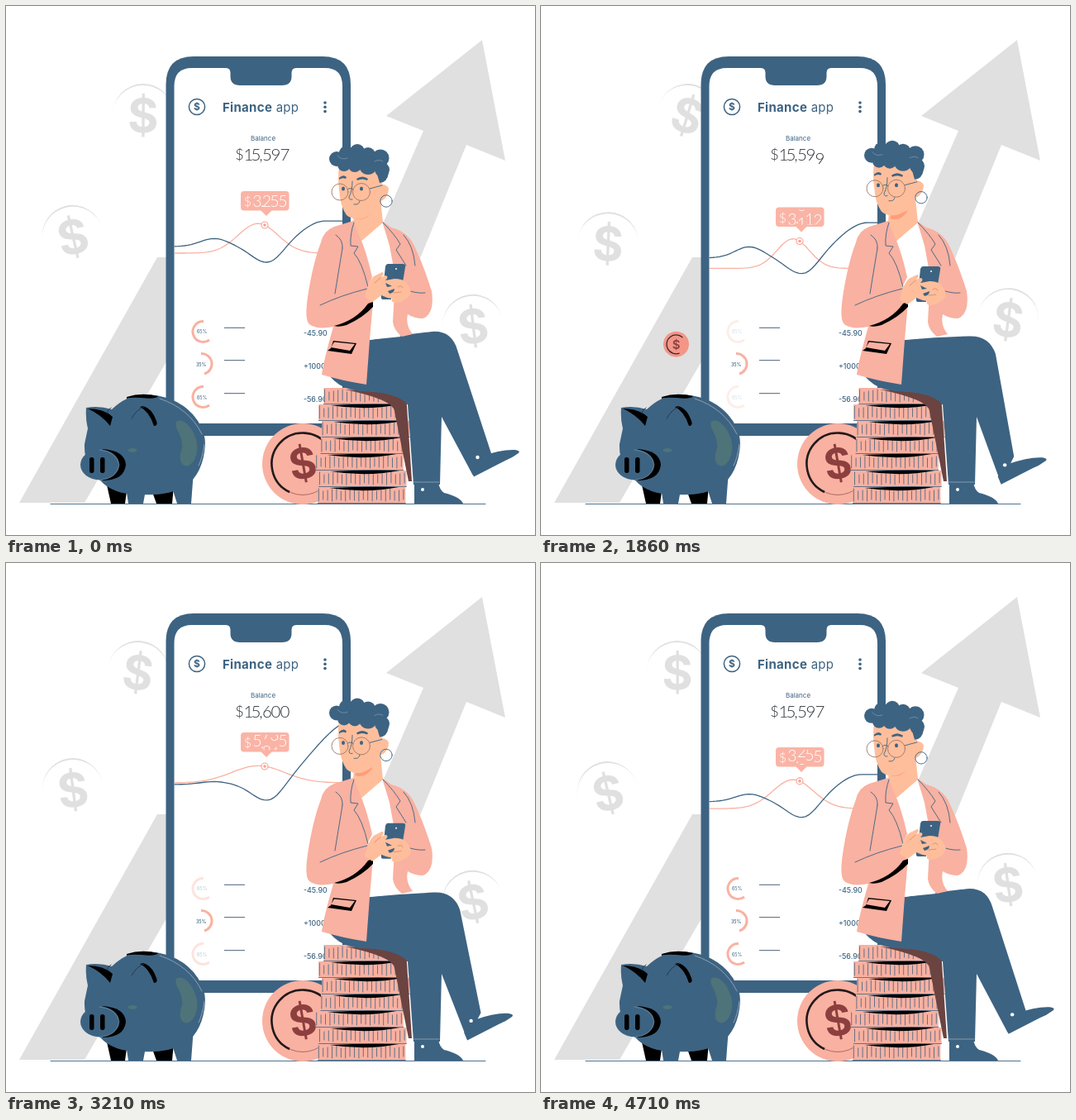
An HTML page that plays this animation: 640 by 640 pixels, repeating every 4.78 s.

```html
<!DOCTYPE html>
<html lang="en">
<head>
<meta charset="utf-8">
<title>Finance app</title>
<style>
  html, body { margin: 0; width: 100%; height: 100%; overflow: hidden; background: #fff; }
  svg { display: block; width: 100%; height: 100%; }
  text { text-anchor: middle; }
  .ui { font-family: Inter, sans-serif; fill: #3d6382; }
  .num { font-family: Lato, sans-serif; font-weight: 300; }
  .left text, text.left { text-anchor: start; }
  .blue { fill: #3d6382; }
  .pink { fill: #f9b1a1; }
  .skin { fill: #ffbe9b; }
  .grey { fill: #e0e0e0; }
  .line { fill: none; stroke: #3d6382; stroke-width: .9; stroke-linecap: round; }
  .dial { fill: none; stroke: #f9b1a1; stroke-width: 3; }
</style>
</head>
<body>
<svg viewBox="0 0 640 640">
  <defs>
    <clipPath id="screen"><path d="M203.500 75H407V505H203.500Z"/></clipPath>
    <clipPath id="balanceClip"><path d="M280 168.500H350V191H280Z"/></clipPath>
    <clipPath id="bubbleClip"><path d="M284 3H342V21H284Z"/></clipPath>
    <g id="token" class="grey">
      <path d="M-37 0A37 38 0 0 1 37 -2A37 36 0 0 0 -37 0Z"/>
      <text y="20" font-family="Inter, sans-serif" font-weight="700" font-size="57">$</text>
    </g>
  </defs>

  <path class="grey" d="M576 41L604 187L557 168L495 320L440 300L505 151L460 133Z
    M16 601L183 304H200V420L95 601Z"/>
  <use id="token1" href="#token"/>
  <use id="token2" href="#token"/>
  <use id="token3" href="#token"/>

  <g id="phone">
    <path class="blue" d="M193.500 520V95Q193.500 61 227 61H383Q417 61 417 95V506Q417 520 403 520Z"/>
    <path fill="#fff" d="M203.500 505V97Q203.500 75 225 75H266Q271.500 75 271.500 81V85Q271.500 96 283 96H334
      Q345.500 96 345.500 85V81Q345.500 75 351 75H386Q407 75 407 97V505Z"/>
    <circle class="line" cx="231" cy="122" r="9.600" style="stroke-width:1.500"/>
    <g class="ui">
      <text x="231" y="126.300" font-size="12" font-weight="700">$</text>
      <text class="left" x="262" y="127.500" font-size="15" letter-spacing=".3"><tspan
        font-weight="700">Finance</tspan> app</text>
      <circle cx="386" cy="117" r="1.800"/><circle cx="386" cy="122.300" r="1.800"/><circle cx="386" cy="127.600" r="1.800"/>
      <text x="311" y="163.300" font-size="8">Balance</text>
      <g class="left" font-size="8.800" font-weight="500">
        <text x="360" y="399">-45.90</text><text x="360" y="438.500">+1000</text><text x="360" y="478.500">-56.90</text>
      </g>
      <g id="dials" font-size="5.500">
        <path class="dial" d="M239 381.500A12.500 12.500 0 1 0 246 404"/><text x="237" y="396">65%</text>
        <path class="dial" d="M239 460.500A12.500 12.500 0 1 0 246 483"/><text x="237" y="475.500">65%</text>
      </g>
      <path class="dial" d="M236 420.500A12.500 12.500 0 0 1 240 445"/>
      <text x="236" y="435.500" font-size="5.500" font-weight="500">35%</text>
    </g>
    <path d="M264 389.300H289M264 428.700H289M264 468.700H289" stroke="#37506a" stroke-width=".9"/>
    <g class="num" fill="#30343a" font-size="20.500">
      <text x="282.500" y="186" font-size="18">$</text>
      <g id="balance" clip-path="url(#balanceClip)"><text x="308.500" y="187">,</text></g>
    </g>
    <g clip-path="url(#screen)" class="line" style="stroke-width:1.300">
      <path id="pinkCurve" stroke="#f9b1a1"/><path id="blueCurve"/>
    </g>
    <g id="marker">
      <rect fill="#fab4a6" x="284" width="58.500" height="23.500" rx="4"/>
      <path fill="#fab4a6" d="M308 23H322L315 30Z"/>
      <circle cx="313" cy="41" r="4" fill="#fff" stroke="#f9a090" stroke-width="1.100"/>
      <circle cx="313" cy="41" r="1.800" fill="#f9a090"/>
      <g class="num" fill="#fff" font-size="19.500">
        <text x="292.500" y="18" font-size="16">$</text>
        <g id="rate" clip-path="url(#bubbleClip)"><text x="310" y="19">.</text></g>
      </g>
    </g>
  </g>

  <path id="rays" stroke-linecap="round"/>
  <g id="coin">
    <circle id="coinFace" r="15.500"/>
    <path d="M4 11A11.500 11.500 0 1 1 8 -8" fill="none" stroke="#3a2729" stroke-width="1.300"/>
    <text id="coinSign" y="5.500" font-family="Inter, sans-serif" font-size="15" font-weight="600">$</text>
  </g>

  <path class="line" d="M54 602.500H580"/>

  <g id="pig">
    <path d="M121 575L127 602H144L147 580ZM176 585L182 602H201L203 580Z"/>
    <path class="blue" d="M144 575L148 602H166L170 580ZM200 580L207 602H224L227 562Z"/>
    <path class="blue" d="M97 486Q112 483 128 488Q146 471 166 470Q204 470 226 494Q241 511 241 530Q239 566 216 582
      Q194 593 165 591Q130 592 114 574Q94 558 95 530L99 511Q96 500 97 486Z"/>
    <path d="M99 487Q118 487 129 497L126 508Q116 495 99 487ZM162 485Q173 490 179 508Q184 508 182 502Q177 487 166 484Z"/>
    <path d="M146 473Q164 467 184 472Q181 476 164 474Q150 473 146 475Z"/>
    <path class="line" d="M127 486Q122 489 122 493M152 499Q158 488 167 485" style="stroke:#24374a"/>
    <path d="M117 536Q144 538 145 555Q143 574 117 574Z"/>
    <ellipse class="blue" cx="113.500" cy="555" rx="23.500" ry="18.500"/>
    <path class="line" d="M113 537Q134 539 137 555Q134 572 114 573.500" style="stroke:#8099ad;stroke-width:.6"/>
    <rect x="101" y="546" width="5.500" height="19" rx="2.800"/><rect x="114" y="546" width="5.500" height="19" rx="2.800"/>
    <ellipse cx="153" cy="537.500" rx="5.500" ry="2.500" fill="#4e7379"/>
    <path d="M207 502Q216 499 225 513Q236 532 228 549Q220 561 213 554Q208 548 213 535Q214 525 208 514Q203 505 207 502Z" fill="#4e7379"/>
    <path class="line" d="M186 475Q222 487 237 518M240 530Q238 546 233 556" style="stroke:#9db0bd;stroke-width:.8"/>
  </g>

  <g id="bigCoin">
    <circle class="pink" cx="359" cy="554" r="49"/>
    <circle cx="359" cy="554" r="37.500" fill="none" stroke="#9a5a55" stroke-width=".8"/>
    <path d="M343 588A37.500 37.500 0 1 1 390 533" fill="none" stroke="#21191b" stroke-width="2.600"/>
    <text transform="translate(359 553.500) rotate(-10)" y="18" font-family="Inter, sans-serif"
      font-weight="700" font-size="51" fill="#8d3f3f">$</text>
  </g>
  <g id="stack"></g>

  <g id="woman">
    <path d="M410 464L484 469L491 575H487L470 490Q468 476 410 464Z" fill="#6b4340"/>
    <path class="blue" id="leg"/>
    <path class="blue" d="M494 575H523Q524 585 530 589Q550 594 553 602H494Z"/>
    <path class="line" d="M493 576H524" style="stroke:#8ba0b1"/>
    <circle cx="504" cy="585" r="2" fill="#fff"/>
    <g id="foot">
      <path class="blue" d="M574 545Q600 536 616 537Q623 538 620 541Q612 547 604 550L566 569.500L562 560Z"/>
      <circle cx="570.500" cy="546" r="2.200" fill="#fff"/>
    </g>

    <path d="M424 280L455 262L474 310L470 394L478 400L438 404Z" fill="#fff"/>
    <path class="pink" d="M455 260L466 268Q484 272 493 288Q505 313 515 345Q519 373 504 378Q494 378 486 373
      Q483 386 492 397L479 400Q469 392 468 382L471 328L464 290Z"/>
    <path class="skin" d="M421 248L453 232L456 262L427 287L420 262Z"/>
    <path d="M422 257Q436 261 444 247L437 250L424 253Z" fill="#ff9d78"/>
    <path class="pink" d="M420 260L397 267Q384 272 381 286Q371 312 365 352Q361 380 367 385Q376 392 396 388
      Q384 430 382 446Q405 453 436 458L440 404L444 358L437 340L443 328Q436 296 427 277Z"/>
    <path d="M397 387Q424 380 438 360L444 358L444 364Q432 377 412 386Q403 389 397 387Z"/>
    <path class="line" d="M421 262Q416 276 417 290L426 291L421 299Q431 310 438 340M456 262Q470 276 477 288L472 295L484 314
      M380 362Q405 350 437 342M407 293Q408 283 399 277M407 293L398 348M489 345Q500 348 507 347M481 277Q493 290 495 314"/>
    <path d="M396 405L424 408L418 421L389 417L393 414Z"/>
    <path class="pink" d="M397 406.500L422 409L416 417L393 413Z"/>

    <g id="head">
      <path class="skin" d="M403 194Q401 208 403 222Q404 242 412 253Q419 259 431 257Q446 252 452 236
        Q461 235 462 223Q461 215 455 216L452 196Z"/>
      <g class="blue">
        <circle cx="400" cy="185" r="9"/><circle cx="412" cy="178" r="9"/><circle cx="425" cy="176" r="9"/>
        <circle cx="438" cy="180" r="9"/><circle cx="453" cy="184" r="10.500"/><circle cx="455" cy="198" r="9"/>
        <circle cx="409" cy="192" r="8"/><circle cx="422" cy="193" r="8"/><circle cx="438" cy="193" r="11"/>
        <circle cx="426" cy="185" r="10"/>
        <path d="M448 200L452 214Q461 214 463 202Z"/>
        <ellipse cx="408" cy="221" rx="2" ry="2.500"/><ellipse cx="430" cy="221" rx="2" ry="2.500"/>
        <path d="M403 208Q408 203 412 207L411 209Q407 207 403 210ZM424 209Q431 204 438 209L437 211Q431 208 425 211Z"/>
      </g>
      <path class="skin" d="M453 220Q460 214 463 221Q463 231 454 234Z"/>
      <g class="line">
        <path d="M419 212Q419 224 415 231Q415 235 419 234M421 240Q427 241 428 236M440 221L455 217M413 222Q416 219 420 222"/>
        <g stroke="#a17868"><circle cx="404" cy="225" r="10"/><circle cx="430" cy="225" r="10.500"/></g>
        <circle cx="460" cy="236" r="7.200"/>
        <path d="M401 181Q406 187 413 184M446 188Q452 185 456 188" stroke="#9fb3c3" stroke-width=".5"/>
      </g>
    </g>

    <g id="hands">
      <path class="blue" d="M462 312H480Q484 312 483 316L477 352H458Q454 356 455 352L459 315Q460 312 462 312Z"/>
      <path class="blue" d="M454 349H466V355H456Q453 355 454 349Z"/>
      <circle cx="472" cy="318" r="1" fill="#fff"/>
      <path class="skin" d="M434 352L437 341Q440 332 445 327L455 322Q459 323 454 328L459 326Q464 327 459 332L470 330
        Q479 330 484 334Q492 345 489 349Q484 357 472 359Q465 359 467 354Q460 353 454 350Q448 355 443 358Z"/>
      <path class="blue" d="M459 335L467 339L461 340ZM462 345L470 342Q470 347 464 348Z"/>
      <path class="line" d="M446 335L453 329M474 340Q478 337 480 341M469 347L478 346" style="stroke:#c98265;stroke-width:.7"/>
    </g>
  </g>
</svg>

<script>
const LOOP = 4780;
const TIMES = [0, 570, 1430, 2290, 3210, 4140];
// Chart heights at TIMES.
const PEAK = [265, 276, 291, 273, 246, 256];
const PINK_BASE = [299, 313, 327, 302, 266, 282];
const BLUE_BASE = [291, 308, 317, 289, 268, 270];
const BLUE_LIFT = [31, 33, 40, 48, 78, 59];

const $ = id => document.getElementById(id);
const set = (el, name, value) => el.setAttribute(name, value);
const add = (parent, tag, attrs) => {
  const el = document.createElementNS('http://www.w3.org/2000/svg', tag);
  for (const name in attrs) set(el, name, attrs[name]);
  return parent.appendChild(el);
};
const ramp = (t, a, b) => Math.min(1, Math.max(0, (t - a) / (b - a)));
const ease = u => u * u * (3 - 2 * u);
const bell = u => Math.exp(-u * u);
const wave = (t, crest) => Math.cos((t - crest) / LOOP * 2 * Math.PI);
const mix = (a, b, u) => `rgb(${a.map((c, i) => Math.round(c + (b[i] - c) * u))})`;

// Smooth periodic interpolation through values placed at TIMES.
function smooth(vals, t) {
  const n = TIMES.length;
  const at = i => TIMES[(i + n) % n] + Math.floor(i / n) * LOOP;
  const val = i => vals[(i + n) % n];
  let i = n - 1;
  while (TIMES[i] > t) i--;
  const slope = j => (val(j + 1) - val(j - 1)) / (at(j + 1) - at(j - 1));
  const h = at(i + 1) - at(i), u = (t - at(i)) / h, v = 1 - u;
  return val(i) + (val(i + 1) - val(i)) * ease(u) + h * u * v * (v * slope(i) - u * slope(i + 1));
}

function plot(id, f) {
  let d = '';
  for (let x = 204; x <= 408; x += 4) d += `${d ? 'L' : 'M'}${x} ${f(x).toFixed(2)}`;
  set($(id), 'd', d);
}

// One rolling digit column: two stacked digits slide past a clip window.
function column(parent, x, base, pitch, value) {
  const cells = [0, 1].map(() => add(parent, 'text', { x }));
  return t => {
    const p = value(t), low = Math.floor(p);
    cells.forEach((cell, i) => {
      cell.textContent = (low + i) % 10;
      set(cell, 'y', base + (low + i - p) * pitch);
    });
  };
}

// The balance counts 15,597 up to 15,600, then all reels spin round.
const spin = t => 1 - (1 - ramp(t, 3800, 4700)) ** 2;
const reel = (x, from, mid, to, begin) => column($('balance'), x, 187, 25,
  t => from + (mid - from) * ramp(t, begin, 3100) + (to - mid) * spin(t));
const rate = (x, vals) => column($('rate'), x, 19, 22, t => smooth(vals, t));
const columns = [
  reel(293.5, 1, 1, 11, 0), reel(302.5, 5, 5, 15, 0), reel(316, 5, 6, 15, 2400),
  reel(326.5, 9, 10, 19, 2400), reel(337.5, 7, 10, 17, 0),
  rate(304, [3, 3, 3, 3, 5.1, 4.5]), rate(315.5, [2, 1.5, 1.15, 1, 7.5, 6.3]),
  rate(325, [5, 3.5, 1.3, 1, 3.4, 5.5]), rate(335, [5, 4.1, 2.3, 2, 5.1, 5])
];

for (let i = 0; i < 7; i++) {
  const x = 384.5 - 1.2 * i - (i % 3 === 1 ? 5 : 0), y = 462 + i * 20, w = 106, g = $('stack');
  add(g, 'rect', { x, y, width: w, height: 19.5, class: 'pink' });
  let d = `M${x} ${y + 19.5}h${w}`;
  for (let j = 0; j < 20; j++) d += `M${x + 1 + j * 5.4} ${y + 2 + j * 7 % 4}V${y + 17 - j * 5 % 3}`;
  add(g, 'path', { d, class: 'line', style: 'stroke-width:.8' });
  if (i) add(g, 'path', { d: `M${x + 14} ${y + 1}q41 -2 84 -1q-40 8 -84 1Z` });
}

function drawChart(t) {
  const peak = smooth(PEAK, t), pink = smooth(PINK_BASE, t);
  const blue = smooth(BLUE_BASE, t), lift = smooth(BLUE_LIFT, t);
  const width = 40 - (pink - 282) * .35;
  const height = (pink - peak) / bell(8 / width);
  plot('pinkCurve', x => pink - height * bell((x - 305) / width));
  plot('blueCurve', x => blue - (blue - 255) * .27 * bell((x - 252) / 24) + 19 * bell((x - 315) / 25)
    - lift * ease(ramp(x, 318, 363 + lift * .75)));
  set($('marker'), 'transform', `translate(0 ${peak - 41})`);
}

function drawCoin(t) {
  const shown = t > 350 && t < 2700;
  set($('coin'), 'visibility', shown ? 'visible' : 'hidden');
  set($('rays'), 'visibility', t > 400 && t < 1700 ? 'visible' : 'hidden');
  if (!shown) return;
  const y = 406 + 74 * ramp(t, 1750, 2290) ** 2 + 60 * ramp(t, 2290, 2700);
  const size = .9 * ramp(t, 350, 550) + .1 * ramp(t, 550, 800), warm = ramp(t, 560, 900);
  set($('coin'), 'transform', `translate(163.500 ${y}) scale(${size})`);
  set($('coinFace'), 'fill', mix([250, 250, 250], [243, 150, 136], warm));
  set($('coinSign'), 'fill', mix([205, 205, 205], [141, 63, 63], warm));

  const out = ramp(t, 600, 1430);
  const r1 = 18 + 14 * out, r2 = r1 + 14 * ramp(t, 400, 560) - 11 * out;
  let d = '';
  for (let i = 0; i < 8; i++) {
    const c = Math.cos(i * Math.PI / 4), s = Math.sin(i * Math.PI / 4);
    d += `M${163.5 + c * r1} ${406 + s * r1}L${163.5 + c * r2} ${406 + s * r2}`;
  }
  set($('rays'), 'd', d);
  set($('rays'), 'stroke', mix([255, 255, 255], [176, 72, 76], ramp(t, 700, 1300)));
  set($('rays'), 'stroke-width', 3.2 - 1.7 * out);
  set($('rays'), 'opacity', 1 - ramp(t, 1400, 1700));
}

function draw(t) {
  const k = 1 - Math.abs(2 * t / LOOP - 1);
  const place = (id, x, y, turn = 0) => set($(id), 'transform', `translate(${x} ${y}) rotate(${turn})`);
  place('token1', 168 + 11 * wave(t, 1350), 133, 8 + 9 * wave(t, 1950));
  place('token2', 81, 281.5 + 8.5 * wave(t, 1350), -6 + 8.5 * wave(t, 1900));
  place('token3', 565, 391 - 21 * wave(t, 1080), -3 + 13 * wave(t, 1430));
  place('foot', -12 * k, 12 * k);
  place('head', 0, -5.5 * k);
  place('hands', 0, 4 * k);
  set($('leg'), 'd', `M384 436L440 404Q480 ${398 + 3 * k} ${515 + 3 * k} ${394 + 7 * k}
    Q${539 + 4 * k} ${392 + 8 * k} ${546 + 5 * k} ${416 + 6 * k}L${587 - 19 * k} ${541 + 5 * k}
    L${565 - 11 * k} ${568 + 12 * k}L527 497L525 579H493L486 482Q472 467 430 466Q398 464 384 436Z`);
  set($('dials'), 'opacity', 1 - k);
  columns.forEach(update => update(t));
  drawChart(t);
  drawCoin(t);
}

const start = performance.now();
function tick(now) {
  draw(Math.max(0, now - start) % LOOP);
  requestAnimationFrame(tick);
}
draw(0);
requestAnimationFrame(tick);
</script>
</body>
</html>
```
